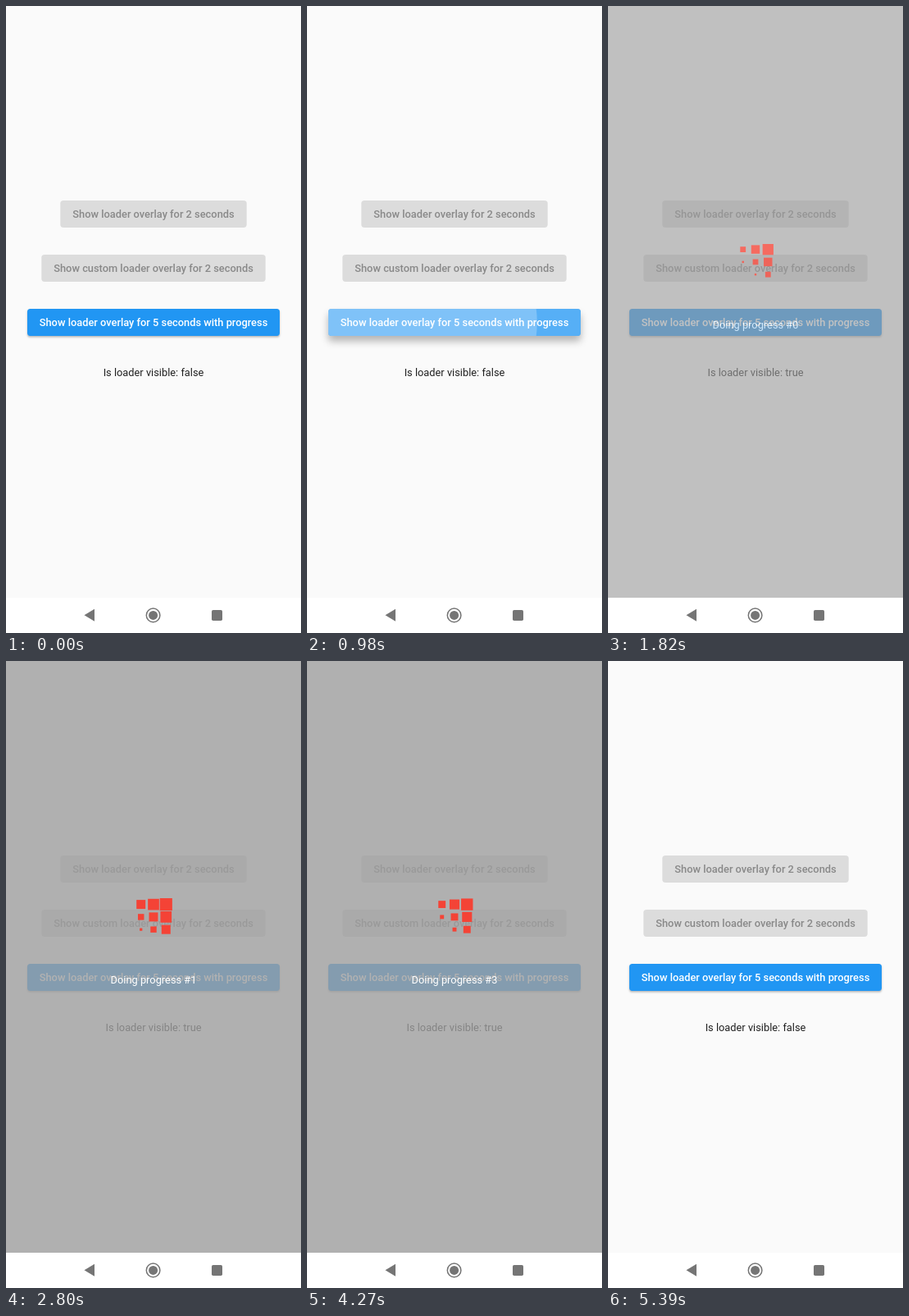
Write an HTML page with a canvas that moves like this. It is 360 by 764 pixels and loops after 5530 ms.

```html
<!DOCTYPE html>
<html lang="en">
<head>
<meta charset="utf-8">
<title>Loader overlay demo</title>
<style>
  html, body { margin: 0; width: 100%; height: 100%; overflow: hidden; background: #fafafa; }
  canvas { position: absolute; left: 0; top: 0; width: 360px; height: 764px; }
</style>
</head>
<body>
<canvas id="page"></canvas>
<canvas id="overlay"></canvas>
<script>
const W = 360, H = 764, BAR = 721, DP = 360 / 392.73;
const LOOP = 5530, STEP = 70;
const PRESS = 540, RELEASE = 1040, HIDE = 5250;
const FONT = 14 * DP;
const ratio = window.devicePixelRatio || 1;

function context(id) {
  const canvas = document.getElementById(id);
  canvas.width = W * ratio;
  canvas.height = H * ratio;
  const ctx = canvas.getContext('2d');
  ctx.scale(ratio, ratio);
  return ctx;
}
const page = context('page'), over = context('overlay');

const clamp = v => Math.max(0, Math.min(1, v));
const mix = (a, b, k) => a + (b - a) * k;
const ramp = (t, start, length) => clamp((t - start) / length);

function bezier(x1, y1, x2, y2) {
  const at = (a, b, s) => 3 * a * s * (1 - s) ** 2 + 3 * b * s * s * (1 - s) + s ** 3;
  return x => {
    if (x <= 0 || x >= 1) return clamp(x);
    let lo = 0, hi = 1;
    for (let i = 0; i < 24; i++) {
      const mid = (lo + hi) / 2;
      if (at(x1, x2, mid) < x) lo = mid; else hi = mid;
    }
    return at(y1, y2, lo);
  };
}
const ease = bezier(0.25, 0.1, 0.25, 1);
const easeIn = bezier(0.42, 0, 1, 1);
const standard = bezier(0.4, 0, 0.2, 1);

function label(ctx, text, y, color, weight = 400) {
  ctx.font = `${weight} ${FONT}px Roboto, sans-serif`;
  ctx.textAlign = 'center';
  ctx.textBaseline = 'alphabetic';
  ctx.fillStyle = color;
  ctx.fillText(text, W / 2, y + 4.4);
}

function buttonPath(width, y) {
  page.beginPath();
  page.roundRect((W - width) / 2, y - 18 * DP, width, 36 * DP, 4 * DP);
}

function disabledButton(text, width, y) {
  buttonPath(width, y);
  page.fillStyle = 'rgba(0,0,0,0.12)';
  page.fill();
  label(page, text, y, 'rgba(0,0,0,0.38)', 500);
}

function activeButton(text, width, y, t) {
  const pressed = standard(ramp(t, PRESS, 200)) - standard(ramp(t, RELEASE, 200));
  const lift = mix(2, 8, pressed) * DP;

  page.save();
  buttonPath(width, y);
  page.shadowColor = 'rgba(0,0,0,0.28)';
  page.shadowOffsetY = lift * 0.9 * ratio;
  page.shadowBlur = lift * 1.3 * ratio;
  page.fillStyle = '#2196f3';
  page.fill();
  page.restore();

  page.save();
  buttonPath(width, y);
  page.clip();
  page.fillStyle = `rgba(255,255,255,${0.24 * pressed})`;
  page.fill();
  ripple(y, t);
  page.restore();

  label(page, text, y, '#fff', 500);
}

// Grows slowly while held, then quickly once released.
function ripple(y, t) {
  const alpha = 0.24 * ramp(t, PRESS, 75) * (1 - ramp(t, RELEASE + 225, 150));
  if (alpha <= 0) return;
  const held = Math.min(t, RELEASE) - PRESS;
  const k = ease(clamp(held / 1000 + Math.max(0, t - RELEASE) / 225));
  page.beginPath();
  page.arc(mix(70, W / 2, k), y, mix(46, 160, k), 0, Math.PI * 2);
  page.fillStyle = `rgba(255,255,255,${alpha})`;
  page.fill();
}

function navBar() {
  page.fillStyle = '#fff';
  page.fillRect(0, BAR, W, H - BAR);
  page.fillStyle = page.strokeStyle = '#757575';
  page.beginPath();
  page.moveTo(95.5, 742.3);
  page.lineTo(108, 734.8);
  page.lineTo(108, 749.8);
  page.fill();
  page.beginPath();
  page.arc(179.6, 742.4, 8.3, 0, Math.PI * 2);
  page.lineWidth = 1.5;
  page.stroke();
  page.beginPath();
  page.arc(179.6, 742.4, 5.5, 0, Math.PI * 2);
  page.fill();
  page.beginPath();
  page.roundRect(251, 736, 13, 13, 1.8);
  page.fill();
}

function cubes(time) {
  const turn = time / 1200 % 2;
  const phase = turn > 1 ? 2 - turn : turn;
  const cell = 50 / 3 * DP;
  over.fillStyle = '#f44336';
  for (let row = 0; row < 3; row++) {
    for (let col = 0; col < 3; col++) {
      const start = 0.1 * (3 + col - row);
      const size = cell * (1 - easeIn(ramp(phase, start, 0.5)));
      const x = W / 2 + (col - 1) * cell, y = 311.9 + (row - 1) * cell;
      over.fillRect(x - size / 2, y - size / 2, size, size);
    }
  }
}

function drawOverlay(t) {
  over.clearRect(0, 0, W, H);
  over.canvas.style.opacity = ramp(t, RELEASE, 1000);
  // The spinner rests briefly when all cubes are full.
  const time = t < 3440 ? t - RELEASE : Math.max(2400, t - RELEASE - 115);
  over.fillStyle = 'rgba(158,158,158,0.8)';
  over.fillRect(0, 0, W, BAR);
  cubes(time);
  label(over, 'Doing progress #' + Math.min(3, Math.floor(time / 1000)), 388.2, '#fff');
}

function draw(t) {
  const visible = t >= RELEASE && t < HIDE;
  page.fillStyle = '#fafafa';
  page.fillRect(0, 0, W, H);
  disabledButton('Show loader overlay for 2 seconds', 227.4, 253.4);
  disabledButton('Show custom loader overlay for 2 seconds', 273.4, 319.4);
  activeButton('Show loader overlay for 5 seconds with progress', 308, 385.4, t);
  label(page, 'Is loader visible: ' + visible, 446.4, 'rgba(0,0,0,0.87)');
  navBar();
  if (visible) drawOverlay(t);
  else over.canvas.style.opacity = 0;
}

const begin = performance.now();
function tick() {
  const t = (performance.now() - begin) % LOOP;
  draw(Math.floor(t / STEP) * STEP);
  requestAnimationFrame(tick);
}
tick();
</script>
</body>
</html>
```
